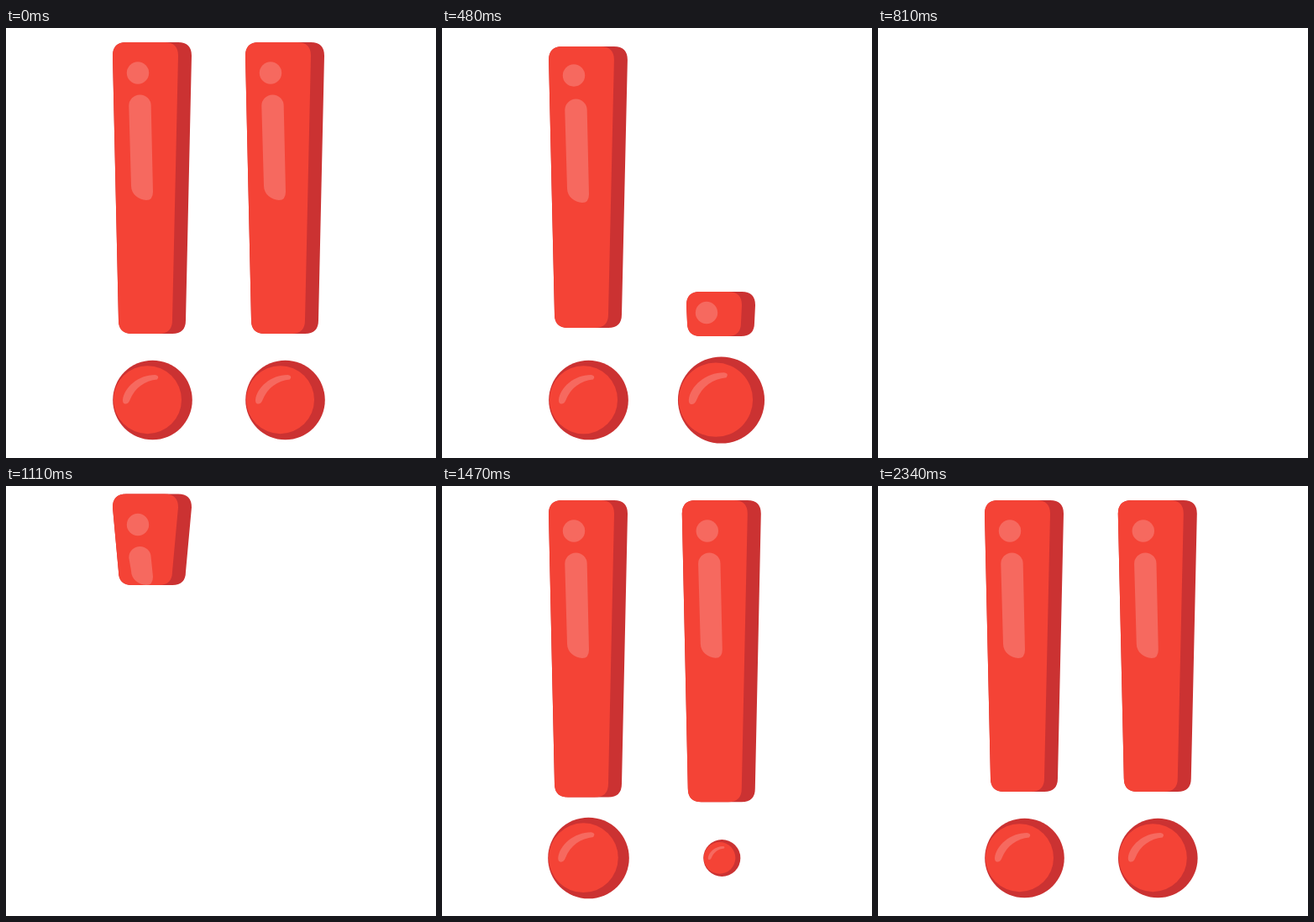
Recreate the animation shown at these times as an HTML page. Size 512 by 512 pixels, loop 2400 ms.

```html
<!DOCTYPE html>
<html lang="en">
<head>
<meta charset="utf-8">
<title>Double exclamation</title>
<style>
  html, body { margin: 0; width: 100%; height: 100%; overflow: hidden; background: #fff; }
  svg { display: block; width: 100%; height: 100%; }
  .side { fill: #cb3232; }
  .face { fill: #f44336; }
  .shine { fill: #f6695f; }
</style>
</head>
<body>
<svg viewBox="0 0 512 512">
  <defs>
    <g id="dot">
      <circle class="side" r="47.3"/>
      <circle class="face" cx="-6" cy="-.3" r="40.5"/>
      <path class="shine" d="M-35.500 0C-34-15-17-30 3-30Q9-29 5.500-24.500C-9-23-21-15-27 0Q-29 5-33 4.500Q-35.500 4-35.500 0Z"/>
    </g>
  </defs>
</svg>
<script>
const LOOP = 2400, STEP = 30, TOP = 17, BOTTOM = 364;
const svg = document.querySelector('svg');

const add = (parent, tag, attrs = {}) => {
  const el = document.createElementNS('http://www.w3.org/2000/svg', tag);
  for (const k in attrs) el.setAttribute(k, attrs[k]);
  return parent.appendChild(el);
};
const part = (t, a, b) => Math.min(1, Math.max(0, (t - a) / (b - a)));
const smooth = u => u * u * (3 - 2 * u);
const mix = (a, b, u) => a + (b - a) * u;
const show = (el, on) => el.setAttribute('visibility', on ? 'visible' : 'hidden');

// Tapered slab with rounded corners
function slab(left, right, inset, top, bottom) {
  const r = Math.min(16, (bottom - top) / 2), low = 7;
  const a = left + inset, b = right - inset, c = right - low, d = left + low;
  return `M${a + r} ${top}H${b - r}Q${b} ${top} ${b} ${top + r}` +
    `L${c} ${bottom - r}Q${c} ${bottom} ${c - r} ${bottom}` +
    `H${d + r}Q${d} ${bottom} ${d} ${bottom - r}L${a} ${top + r}Q${a} ${top} ${a + r} ${top}Z`;
}

function pill(top, bottom) {
  return `M146.300 ${top + 13.2}a13.2 13.2 0 0 1 26.400 0L175 ${bottom - 10}` +
    `Q175 ${bottom} 167 ${bottom}C158 ${bottom - 0.5} 149 ${bottom - 7} 149 ${bottom - 17}Z`;
}

// Hop up, then collapse into the dot, which swells and shrinks
function leave(t) {
  const hop = 11 * smooth(part(t, 0, 170));
  const u = Math.max(0, (t - 170) / 310);
  const top = TOP - hop + 308 * u ** 3.4;
  return {
    top,
    bottom: BOTTOM - hop + 14 * u ** 1.44,
    spot: 36.5 - 11.5 * u * u,
    pillEnd: 205 + 0.6 * (top - TOP),
    dot: (1 + 0.09 * smooth(part(t, 290, 440))) * (1 - part(t, 480, 630) ** 3)
  };
}

// Grow downwards past the resting length and settle, then pop the dot
function enter(t) {
  const u = 1 - (1 - part(t, 0, 240)) ** 2.77;
  const bottom = mix(118, 377, u) - 13 * smooth(part(t, 240, 480));
  return {
    top: mix(9.5, TOP, u),
    bottom: t < 0 ? 0 : bottom,
    spot: 36.5,
    pillEnd: mix(118, 205, u),
    dot: 1.09 * smooth(part(t, 140, 295)) - 0.09 * smooth(part(t, 295, 390))
  };
}

function makeMark() {
  const g = add(svg, 'g'), bar = add(g, 'g');
  const side = add(bar, 'path', { class: 'side' });
  const face = add(bar, 'path', { class: 'face' });
  const spot = add(bar, 'circle', { class: 'shine', cx: 157, r: 13.2 });
  const streak = add(bar, 'path', { class: 'shine' });
  const dot = add(g, 'use', { href: '#dot' });

  return (p, x) => {
    g.setAttribute('transform', `translate(${x})`);
    const solid = p.bottom - p.top > 28;
    bar.setAttribute('display', solid ? 'inline' : 'none');
    if (solid) {
      const inset = 7 * Math.max(0, p.top - TOP) / (BOTTOM - TOP);
      side.setAttribute('d', slab(127, 221, inset, p.top, p.bottom));
      // The face's right edge leans in the same direction as the side's
      face.setAttribute('d', slab(127, 205, inset, p.top, p.bottom));
      spot.setAttribute('cy', p.top + p.spot);
      const start = p.top + 62.5, end = Math.min(p.pillEnd, p.bottom);
      show(streak, end - start > 30);
      streak.setAttribute('d', pill(start, end));
    }
    show(dot, p.dot > 0.001);
    dot.setAttribute('transform', `translate(174.5 443) scale(${p.dot})`);
  };
}

const left = makeMark(), right = makeMark();

function draw(ms) {
  const t = Math.floor(ms % LOOP / STEP) * STEP;
  if (t < 900) {
    left(leave(t - 180), 0);
    right(leave(t), 158);
  } else {
    left(enter(t - 1110), 0);
    right(enter(t - 1260), 158.8);
  }
}

let origin;
function tick(now) {
  origin ??= now;
  draw(now - origin);
  requestAnimationFrame(tick);
}
draw(0);
requestAnimationFrame(tick);
</script>
</body>
</html>
```
